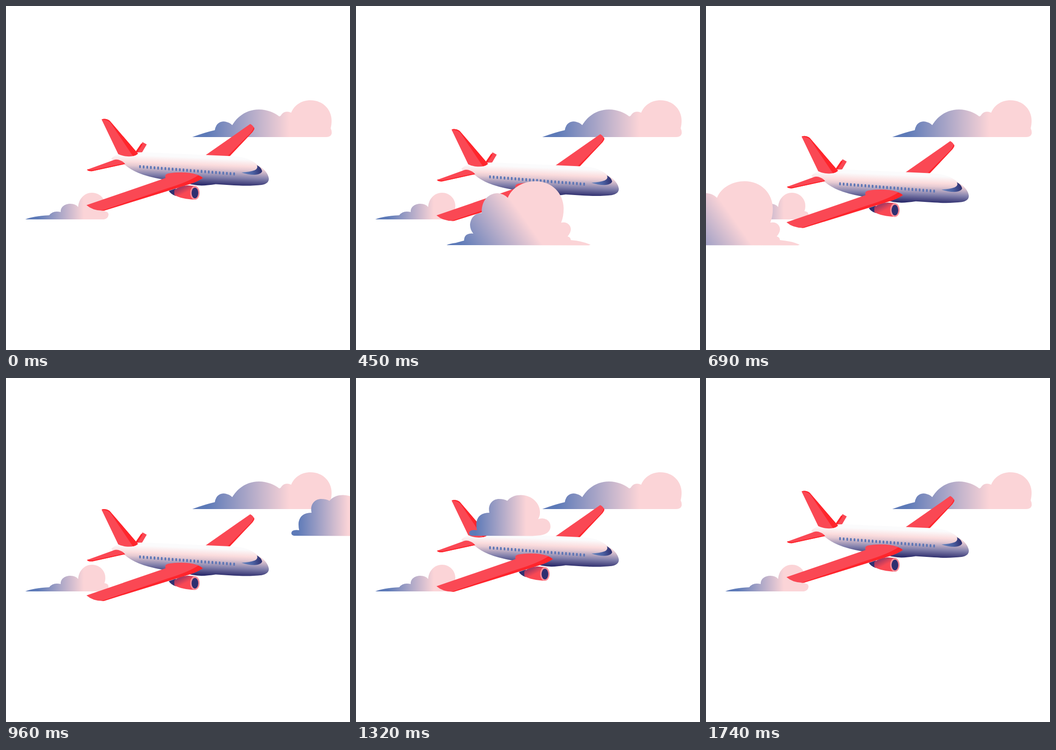
Animation, 748 px wide and 748 px high, one loop 1770 ms. Source, as an HTML page:

```html
<!DOCTYPE html>
<html lang="en">
<head>
<meta charset="utf-8">
<title>Plane and clouds</title>
<style>
  html, body { margin: 0; width: 100%; height: 100%; overflow: hidden; background: #fff; }
  svg { display: block; width: 100vw; height: 100vh; }
  stop.blue { stop-color: #5d7ab8; }
  stop.pink { stop-color: #fbd4d7; }
  .red { fill: #fa4854; }
  .dark { fill: #ff252c; }
  .navy { fill: #2f2f70; }
</style>
</head>
<body>
<svg viewBox="0 0 748 748">
  <defs>
    <linearGradient id="sky" gradientUnits="userSpaceOnUse" x1="412" y1="0" x2="616" y2="0">
      <stop class="blue" offset=".12"/><stop class="pink" offset="1"/>
    </linearGradient>
    <linearGradient id="low" gradientUnits="userSpaceOnUse" x1="55" y1="0" x2="169" y2="0">
      <stop class="blue" offset=".12"/><stop class="pink" offset="1"/>
    </linearGradient>
    <linearGradient id="big" gradientUnits="userSpaceOnUse" x1="538" y1="602" x2="668" y2="510">
      <stop class="blue" offset=".08"/><stop class="pink" offset="1"/>
    </linearGradient>
    <linearGradient id="small" gradientUnits="userSpaceOnUse" x1="416" y1="0" x2="526" y2="0">
      <stop class="blue" offset="0"/><stop class="pink" offset="1"/>
    </linearGradient>
    <linearGradient id="hull" gradientUnits="userSpaceOnUse" x1="452" y1="326" x2="449.5" y2="389">
      <stop offset=".08" stop-color="#fbfbfc"/>
      <stop offset=".32" stop-color="#fbdcdd"/>
      <stop offset=".44" stop-color="#e6cad2"/>
      <stop offset=".72" stop-color="#8482ad"/>
      <stop offset="1" stop-color="#2d2d6d"/>
    </linearGradient>
    <linearGradient id="glass" gradientUnits="userSpaceOnUse" x1="518" y1="364" x2="556" y2="354">
      <stop offset="0" stop-color="#5f7dba"/><stop offset=".45" stop-color="#4c62a3"/>
      <stop offset="1" stop-color="#2d2d6d"/>
    </linearGradient>
    <linearGradient id="pod" gradientUnits="userSpaceOnUse" x1="378" y1="391" x2="387" y2="408">
      <stop offset="0" stop-color="#8c3566"/><stop offset="1" stop-color="#fa4854"/>
    </linearGradient>
  </defs>

  <path fill="url(#sky)" d="M405 285Q432 275 454 270Q457 252 473 251Q485 252 492 259C505 237 527 225 550 225
    C568 225 584 232 594 240Q597 240 599 236Q607 226 620 232C627 215 643 205 662 205C690 205 708 226 708 249
    Q708 258 706 266Q709 272 708 278Q706 285 696 285Z"/>
  <path fill="url(#low)" d="M42 464Q58 457 94 455Q102 444 119 448C118 437 128 430 140 430Q151 430 157 437
    C158 419 171 406 187 406C204 406 217 420 216 436Q216 441 214 446Q223 447 223 454Q222 462 213 464Z"/>

  <g id="plane">
    <path class="red" d="M433 325L531 256.5Q538 260 540 267Q539 270 536 274L486 327Z"/>
    <path class="dark" d="M540 267Q539 270 536 274L486 327H481L530 278Q537 271 539 263Z"/>
    <path class="red" d="M279 321L297 296L306 301L296 318L285 321Z"/>
    <path class="dark" d="M279 321L294 299L297 301L286 318L296 318L285 321Z"/>
    <path fill="url(#hull)" d="M229 332Q235 325 246 322Q270 318 300 318L480 326Q512 327 527 333Q540 339 549 347
      Q569 359 571.5 375Q572 386 556 389Q530 392 496 390L456 387.5Q438 390 425 390.5Q405 390 385 383
      L340 377Q307 371 288 363Q271 356 258 345L236 339Z"/>
    <path fill="url(#glass)" d="M545.5 346Q555 351 557 359Q555 366 540 367Q526 367 512 362Q531 361 541 357Q549 353 545.5 346Z"/>
    <g id="windows" fill="#5b75b5"></g>
    <path class="red" d="M208 247Q209 245 215 245.5Q222 246 226 250L287 321Q279 328 264 327Q252 326 244 322Z"/>
    <path class="dark" d="M208 247Q209 245 215 245.5Q222 246 226 250L287 321Q283 325 276 326.5L228 255Q222 247 208 247Z"/>
    <path class="red" d="M176 356L234 335Q241 332 249 336Q255 338 259 343.5L188 359Q180 360 176 356Z"/>
    <path class="dark" d="M176 356L179 355Q184 358 192 356L257 342L259 343.5L188 359Q180 360 176 356Z"/>
    <path class="navy" d="M354 402L369 397V413Q358 409 354 402Z"/>
    <path fill="url(#pod)" d="M366 400Q378 391 395 390L412 391.5V421Q382 420 366 411Z"/>
    <ellipse cx="410.7" cy="406.3" rx="10.3" ry="15" fill="#fa8d98"/>
    <ellipse class="navy" cx="410.8" cy="406.5" rx="7.3" ry="11.5"/>
    <path class="red" d="M175 433L347 374Q344 366 353 364Q376 360 400 363Q417 365 428 374Q415 383 397 388
      L213 445Q190 446 175 433Z"/>
    <path class="dark" d="M418 368Q424 370 428 374Q415 383 397 388L213 445L207 445.3L352 396Q398 382 418 368Z"/>
  </g>

  <path id="cloudA" fill="url(#big)" d="M465 520Q470 517 485 515L503 510Q503 497 515 495Q520 494 523 495
    Q514 483 516.5 471Q521 451 541.5 450C540 425 555 407 576 407Q589 408 598 417C608 393 634 381 658 381
    C695 381 719 408 719.5 440Q719.5 458 714 471C728 468 736 478 735 487Q734 494 728 501Q735 503 735 509
    Q760 511 778 519L774 520.5Z"/>
  <path id="cloudB" fill="url(#small)" d="M408 343Q402 342 402 337Q403 329 419 331Q417 321 418 313Q422 293 446 293
    C442 275 453 263 467 263Q478 263 485 267Q496 254 515 254.5C540 255 557 274 556 293Q556 300 552 307
    Q562 303 571 308Q579 313 579 324Q577 339 557 342L540 343.5Z"/>
</svg>
<script>
const LOOP = 1770, STEP = 30;
const DIP = 41, LOW = 855, TOP = 1765;
const $ = id => document.getElementById(id);
const ease = p => (1 - Math.cos(Math.PI * Math.min(1, p))) / 2;
const move = (id, x, y) => $(id).setAttribute("transform", `translate(${x} ${y})`);

for (let i = 0; i < 27; i++) {
  const pane = document.createElementNS("http://www.w3.org/2000/svg", "rect");
  const set = { x: 289.6 + i * 7.87, y: 346 + i * 0.61, width: 3.6, height: 6.6, rx: 1.5 };
  for (const key in set) pane.setAttribute(key, set[key]);
  $("windows").append(pane);
}

function draw(t) {
  const y = t < LOW ? ease(t / LOW) : 1 - ease((t - LOW) / (TOP - LOW));
  move("plane", 0, DIP * y);
  move("cloudA", -1.276 * (t - 240), 0);
  move("cloudB", -1.04 * (t - 1170), 0);
}

const start = performance.now();
function tick() {
  const t = (performance.now() - start) % LOOP;
  draw(Math.floor(t / STEP) * STEP);
  requestAnimationFrame(tick);
}
tick();
</script>
</body>
</html>
```
